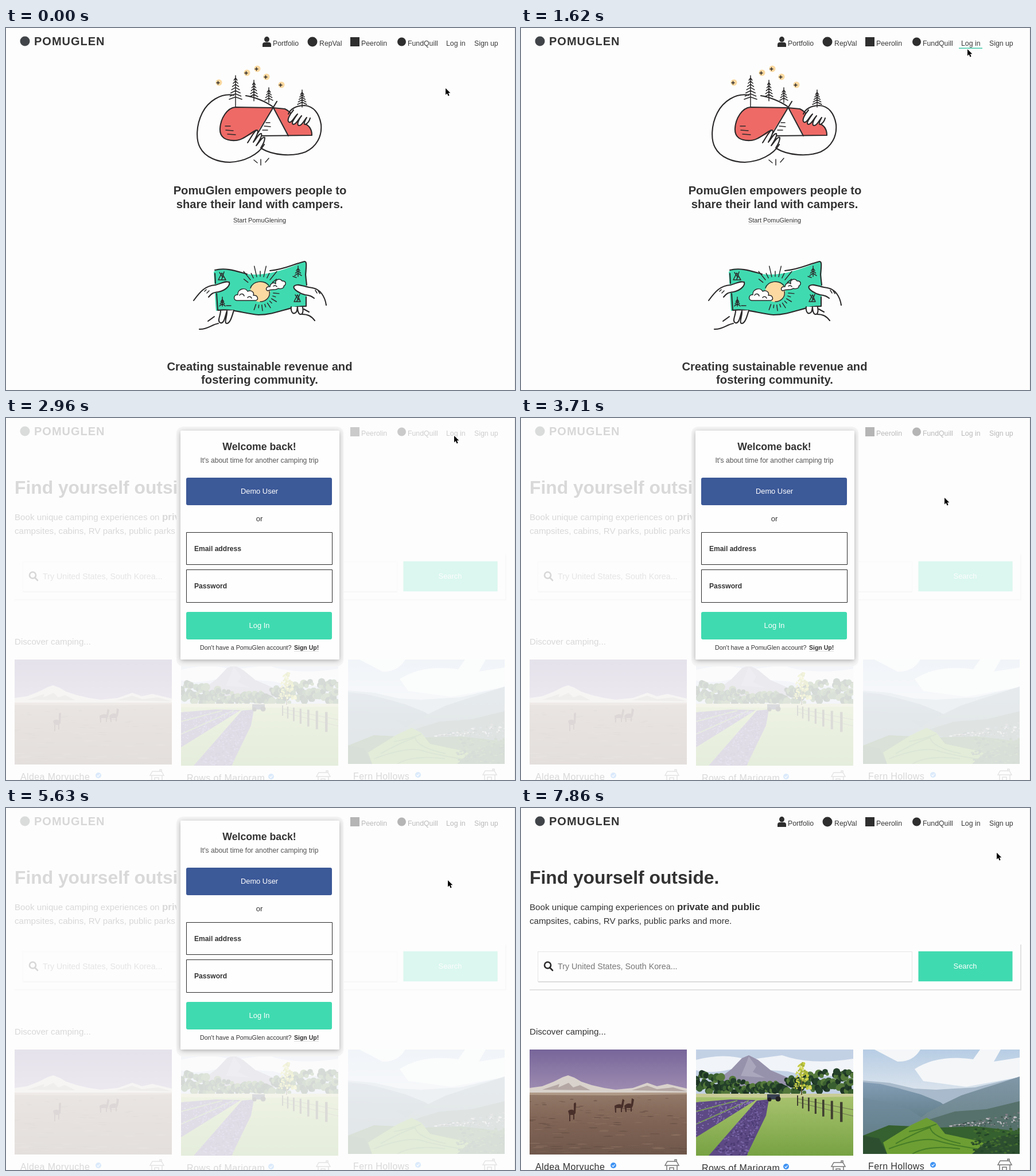
Recreate the animation shown at these times as an HTML page. Size 887 by 631 pixels, loop 8000 ms.

```html
<!DOCTYPE html>
<html lang="en">
<head>
<meta charset="utf-8">
<title>Camping</title>
<style>
  html, body { margin: 0; width: 100%; height: 100%; overflow: hidden; background: #fdfdfd; }
  svg { display: block; }
  text { font-family: "Liberation Sans", Arial, sans-serif; fill: #333; white-space: pre; }
  .b { font-weight: 700; }
  .mid { text-anchor: middle; }
  .light { fill: #fff; }
  .ink { fill: none; stroke: #2c2a2b; stroke-width: 2.1; stroke-linecap: round; stroke-linejoin: round; }
  .thin { stroke-width: 1.5; }
  .white { fill: #fdfdfd; }
  #nav text { font-size: 12.3px; fill: #3a3a3a; }
  #nav .icon { fill: #2e2e2e; }
  .head { font-size: 20.2px; }
  .card { font-size: 16px; letter-spacing: .4px; }
</style>
</head>
<body>
<svg width="100%" height="100%" viewBox="0 0 887 631">
  <defs>
    <linearGradient id="dusk" x2="0" y2="1"><stop stop-color="#77659a"/><stop offset="1" stop-color="#a391b4"/></linearGradient>
    <linearGradient id="soil" x2="0" y2="1"><stop stop-color="#937a69"/><stop offset=".4" stop-color="#826657"/><stop offset="1" stop-color="#6f574b"/></linearGradient>
    <linearGradient id="haze" x2="0" y2="1"><stop stop-color="#b7cde4"/><stop offset=".5" stop-color="#e3e9ef"/></linearGradient>
    <linearGradient id="ridge" x2="0" y2="1"><stop stop-color="#839db5"/><stop offset=".5" stop-color="#637f8b"/><stop offset="1" stop-color="#48655a"/></linearGradient>
    <linearGradient id="slope" x2="0" y2="1"><stop stop-color="#8097a8"/><stop offset="1" stop-color="#667f80"/></linearGradient>
    <linearGradient id="lawn" x2="0" y2="1"><stop stop-color="#a9c36f"/><stop offset="1" stop-color="#77a243"/></linearGradient>
    <filter id="shadow" x="-10%" y="-10%" width="120%" height="120%"><feDropShadow dx="0" dy="2" stdDeviation="4" flood-opacity=".3"/></filter>
    <path id="hut" class="thin" fill="none" stroke="#777" d="M-8-8H8L12-1H-12ZM-9-1V10M9-1V10M-4 10V3H3V10M5-8V-11H8V-7"/>
    <g id="badge"><circle r="5" fill="#3f93f3"/><path d="M-2.3 0L-.5 2 2.5-1.8" fill="none" stroke="#fff" stroke-width="1.2"/></g>
  </defs>
  <rect width="887" height="631" fill="#fdfdfd"/>
  <path d="M886.5 0V631" stroke="#ececec"/>

  <g id="home">
    <g id="stars"></g>
    <path fill="#ee6a66" d="M466 138H398C385 139 374 158 372 175C372 190 382 197 400 197C412 195 424 186 439 180ZM467 139L486 141C500 150 512 165 525 170C532 174 534 180 533 187L493 188Z"/>
    <path class="ink" d="M436 178C424 184 412 196 400 196C382 197 372 190 373 175C374 158 385 139 400 138L465 139L486 141C493 144 497 149 501 154M521 167C530 171 533 178 533 187L443 188M472 128L439 183M466 139L492 188"/>
    <path class="ink" d="M397 117C374 113 352 128 342 148C331 170 331 195 338 208C347 226 370 234 390 234C415 233 440 221 450 203M418 118C432 120 453 128 466 138M445 210C465 222 499 225 522 216C541 207 551 189 549 168C546 149 536 136 520 135C505 135 495 142 492 150"/>
    <path class="ink white" d="M421 200C426 193 432 180 437 178C442 178 436 190 431 199C437 192 441 183 445 184C447 187 441 198 436 205C442 198 448 188 451 191C451 196 448 203 444 209"/>
    <path class="ink white" d="M501 143C494 151 489 161 493 164C497 167 503 154 508 150C501 160 496 167 501 168C506 168 511 157 515 153C509 161 506 170 511 170C516 170 520 160 524 156C520 163 518 169 522 168C526 166 529 161 530 157"/>
    <path class="ink thin" d="M382 171H391M383 178L396 179M386 185L400 186M453 165H460M450 171L461 172M447 178H456M432 230L438 235M444 229V239M452 234L458 227"/>
    <g id="trees"></g>

    <g class="b mid">
      <text class="head" x="442.5" y="290">PomuGlen empowers people to</text>
      <text class="head" x="442" y="314">share their land with campers.</text>
      <text class="head" x="442" y="597">Creating sustainable revenue and</text>
      <text class="head" x="442" y="620">fostering community.</text>
    </g>
    <text class="mid" x="442" y="339" font-size="10.9">Start PomuGlening</text>
    <path d="M396 341.5H488" stroke="#ddd"/>

    <path fill="#40dab0" d="M362 425L368 420C385 418 402 425 420 429C455 433 490 420 519 407Q524 406 524 412C522 440 526 465 522 486C494 485 472 500 440 500C415 498 390 489 366 493C364 470 364 450 362 425Z"/>
    <path class="ink" d="M365 445L364 428M364 422C384 417 402 424 420 429M460 423C485 421 500 412 520 407C525 406 523 418 522 430L524 448M523 469V485C495 484 472 500 440 500C415 498 395 489 369 492L367 463"/>
    <circle cx="443" cy="460" r="17.5" fill="#fbd9a0"/>
    <path class="ink thin" d="M426 453C430 441 450 438 458 449M459 459C461 469 453 477 443 477"/>
    <path id="rays" class="ink thin"/>
    <path class="ink thin white" d="M402 475C395 474 397 464 404 465C403 455 417 451 421 459C428 456 433 461 431 466C439 465 441 474 435 475ZM456 458C451 456 454 450 460 451C461 444 467 443 470 446C468 437 479 436 481 441C488 440 489 447 484 450C485 454 478 455 474 454C470 458 464 454 456 458Z"/>
    <path class="ink thin" d="M407 466C409 462 414 463 415 467M421 470C423 467 427 468 428 471M466 450C468 448 471 449 472 451M370 439H383L376 427ZM376 438L380 425M372 426L378 435M502 477H513L508 465ZM507 476L512 464M504 465L510 474M384 484H392M500 433L506 435"/>
    <path class="white" d="M327 474C340 458 349 450 365 447L387 441C394 446 385 456 373 459C362 461 357 464 348 474Z"/>
    <path class="ink" d="M327 475C338 460 347 449 365 448C374 446 382 440 389 443C391 450 381 458 370 460C360 461 357 464 353 469"/>
    <path class="white" d="M558 484C556 469 548 455 534 453C521 452 508 444 502 450C499 455 512 463 521 465C530 466 533 468 537 471Z"/>
    <path class="ink" d="M558 483C556 469 548 455 534 453C521 452 508 444 502 450C499 455 512 463 521 465C530 466 533 468 537 471"/>
    <path class="ink thin" d="M346 459L349 456M350 462L354 458M544 458L547 463M539 457L542 462"/>
    <path class="ink white" d="M374 493C374 501 367 512 374 514C380 516 382 502 385 493C386 501 379 515 385 515C391 514 394 502 397 492M497 486C496 493 499 499 503 497C508 496 507 490 508 486C508 495 511 502 516 498C519 494 517 489 517 486"/>
    <path class="ink" d="M337 525C351 526 358 517 370 515M352 511L363 503M516 499C526 499 532 502 538 510M519 490L528 495"/>
    <g id="noteTrees"></g>
  </g>

  <g id="explore">
    <text class="b" x="15" y="132" font-size="31.8">Find yourself outside.</text>
    <g font-size="15.15">
      <text x="15" y="178">Book unique camping experiences on</text>
      <text class="b" x="272" y="178" font-size="16.9">private and public</text>
      <text x="15" y="202">campsites, cabins, RV parks, public parks and more.</text>
      <text x="15" y="395">Discover camping...</text>
    </g>
    <path d="M15 317H871V238" fill="none" stroke="#e2e2e2" stroke-width="2"/>
    <rect x="29.5" y="250.5" width="652" height="52" fill="#fdfdfd" stroke="#e6e6e6"/>
    <path d="M30 303H682" stroke="#ddd" stroke-width="2"/>
    <path class="ink" style="stroke-width:2.6" d="M50 278L55 283M52 274A5.5 5.5 0 1 1 41 274A5.5 5.5 0 1 1 52 274"/>
    <text x="64" y="281" font-size="14.25" style="fill:#777">Try United States, South Korea...</text>
    <rect x="692.5" y="249.8" width="164" height="52.4" fill="#40dab0"/>
    <text class="light mid" x="774" y="280" font-size="12.9">Search</text>

    <svg x="15" y="421" width="274" height="183">
      <rect width="274" height="80" fill="url(#dusk)"/>
      <path fill="#d9d2cc" d="M0 67L22 64 42 56 58 48 67 45 78 49 90 56 108 62 130 67 150 70 180 67 205 58 222 64 240 60 274 68V80H0Z"/>
      <path fill="#b5a8a4" d="M22 70L52 60 50 66 68 58 76 66 88 62 106 71ZM178 71L205 63 222 69 250 66 274 73Z"/>
      <rect y="75" width="274" height="108" fill="url(#soil)"/>
      <path fill="#b09a88" d="M0 75H274V78L150 80 0 79Z"/>
      <g id="pebbles"></g>
      <g fill="#49302a">
        <path d="M67 107Q72 103 77 106L77 94 80 92 81 95 80 111 78 113V122H76V114H71V125H69V114Z"/>
        <path d="M148 98Q154 94 160 96L162 86 165 88 163 100 161 103V109H159V102H151V110H149Z"/>
        <path d="M165 98Q171 92 177 95L178 85 182 87 180 98 178 102V108H176V102H169V109H167Z"/>
      </g>
    </svg>
    <svg x="305" y="421" width="274" height="185">
      <rect width="274" height="90" fill="#c3d1e5"/>
      <path fill="#f1f4f8" d="M0 18Q50 5 90 18L150 10Q200 28 274 16V42Q210 52 160 38L70 32Q30 44 0 36Z"/>
      <path fill="#9792ac" d="M38 52L62 34 80 15 92 10 108 18 130 36 172 54V66H38Z"/>
      <path fill="#aaa6bc" d="M92 12L105 30 99 39 120 49 78 46 85 30Z"/>
      <g id="hedge"></g>
      <rect y="79" width="274" height="106" fill="url(#lawn)"/>
      <path fill="#c9cc97" d="M0 77H274V82L150 84 0 83Z"/>
      <path fill="#5d4a85" d="M0 92L60 87 104 88 66 112 0 153ZM22 185L106 89 127 87 122 115 88 185Z"/>
      <path fill="none" stroke="#7b9a58" stroke-width="2" d="M0 108L72 89M0 130L92 89"/>
      <g id="lavender"></g>
      <rect x="124" y="78" width="22" height="9" fill="#384052"/><circle cx="128" cy="87" r="3.5" fill="#222"/><circle cx="143" cy="86" r="4.5" fill="#222"/>
      <path fill="none" stroke="#6d7350" d="M178 86L274 105M178 92L274 116"/>
      <path id="fence" fill="#403f31"/>
      <path d="M184 79V42" stroke="#615b30" stroke-width="2"/>
      <g id="sapling"></g>
    </svg>
    <svg x="596" y="421" width="273" height="182">
      <rect width="273" height="182" fill="url(#haze)"/>
      <path fill="#f4f6f8" d="M20 0H100Q87 22 60 21ZM90 34Q130 8 192 17L204 0H240L228 21 273 14V48L180 65 105 55Z"/>
      <path fill="#a8bacb" d="M0 54L46 58 89 68 127 70 195 66 273 48V130H0Z"/>
      <path fill="url(#ridge)" d="M0 57L30 60 60 67 100 78 135 92 160 110 150 150 0 182Z"/>
      <path fill="#708b9b" opacity=".6" d="M0 84L40 92 80 104 110 124 90 140 0 150Z"/>
      <path fill="url(#slope)" d="M80 136L112 110 140 95 171 80 205 69 240 58 273 47V160H80Z"/>
      <path fill="#56716b" d="M70 140L115 122 160 108 215 104 273 90V165H70Z"/>
      <g id="village"></g>
      <path fill="#35602f" d="M0 150L45 132 91 134 110 122 132 136 200 134 273 143V182H0Z"/>
      <path fill="#6d9e33" d="M35 162L85 131 111 119 128 128 143 147 204 160 243 182H42Z"/>
      <path fill="none" stroke="#477d28" stroke-width="2" d="M57 164Q95 143 117 136Q120 153 170 164M45 173Q105 151 130 159T217 176M86 182Q113 166 169 173M80 143Q105 139 128 130"/>
      <path fill="#2d4f30" d="M190 182L210 164 240 151 273 147V182ZM0 182V150L28 155 42 182Z"/>
      <g id="terraces"></g>
    </svg>

    <text class="card" x="25" y="631">Aldea Morvuche</text>
    <text class="card" x="315" y="633">Rows of Marjoram</text>
    <text class="card" x="605" y="630">Fern Hollows</text>
    <use href="#badge" x="161" y="623"/><use href="#badge" x="462" y="625"/><use href="#badge" x="718" y="622"/>
    <use href="#hut" x="263" y="624"/><use href="#hut" x="553" y="626"/><use href="#hut" x="843" y="623"/>
  </g>

  <g id="brand">
    <circle cx="33" cy="23" r="8.5" fill="#414549"/>
    <text class="b" x="49" y="30" font-size="20" letter-spacing="1">POMUGLEN</text>
  </g>
  <g id="nav">
    <path class="icon" d="M454.5 15a4.5 4.8 0 0 1 0 9.6a4.5 4.8 0 0 1 0-9.6M447 33V29Q447 25 451 25H458Q462 25 462 29V33Z"/>
    <circle class="icon" cx="534" cy="24" r="8.5"/>
    <rect class="icon" x="600" y="16" width="16" height="16"/>
    <circle class="icon" cx="689.5" cy="24" r="7.5"/>
    <text x="465" y="31">Portfolio</text>
    <text x="546" y="31">RepVal</text>
    <text x="619" y="31">Peerolin</text>
    <text x="700" y="31">FundQuill</text>
    <text x="767" y="31">Log in</text>
    <text x="816" y="31">Sign up</text>
    <path id="hover" d="M763 35.3H804" stroke="#40c9a8" stroke-width="1.6"/>
  </g>

  <g id="modal">
    <rect x="297" y="15" width="291" height="418" rx="12" fill="#f5f5f5"/>
    <rect x="304" y="22" width="277" height="399" rx="2" fill="#fefefe" filter="url(#shadow)"/>
    <text class="b mid" x="441.5" y="56" font-size="17.7">Welcome back!</text>
    <text class="mid" x="441.5" y="78" font-size="12.1" style="fill:#555">It's about time for another camping trip</text>
    <rect x="314" y="104" width="254" height="48" rx="3" fill="#3c5998"/>
    <text class="light mid" x="441.5" y="132" font-size="12.9">Demo User</text>
    <text class="mid" x="441.5" y="180" font-size="13">or</text>
    <path d="M314.5 199.5H568.5V255.5H314.5ZM314.5 264.5H568.5V321.5H314.5Z" fill="none" stroke="#2a2a2a"/>
    <text class="b" x="328" y="232" font-size="12.1">Email address</text>
    <text class="b" x="328" y="297" font-size="12.1">Password</text>
    <rect x="314" y="338" width="254" height="48" rx="3" fill="#40dab0"/>
    <text class="light mid" x="441.5" y="366" font-size="12.9">Log In</text>
    <text x="338" y="404" font-size="10.7">Don't have a PomuGlen account?</text>
    <text class="b" x="502" y="404" font-size="10.5">Sign Up!</text>
    <path d="M502 406.5H545" stroke="#ddd"/>
  </g>
  <path id="cursor" d="M0 0V11.5L2.7 9 4.6 13.4 6.6 12.5 4.7 8.3H8.3Z" stroke="#fff" stroke-width="1.4" paint-order="stroke"/>
</svg>
<script>
const $ = id => document.getElementById(id);
const noise = n => { const v = Math.sin(n * 12.9898) * 43758.5453; return v - Math.floor(v); };
const repeat = (n, draw) => Array.from({ length: n }, (_, i) => draw(i)).join('');

function tree(x, top, bottom, width, rows) {
  const step = (bottom - top) * .72 / rows;
  const branches = repeat(rows, i => {
    const y = top + 4 + i * step, w = width * (i + 2) / (rows + 1);
    return `M${x - w} ${y + 4}L${x} ${y}L${x + w} ${y + 4}`;
  });
  return `<path class="ink thin" d="M${x} ${top}V${bottom}${branches}"/>`;
}

$('trees').innerHTML = tree(400, 83, 137, 11, 7) + tree(432, 91, 127, 7, 5) +
  tree(458, 104, 130, 7, 4) + tree(516, 108, 138, 8, 5);
$('noteTrees').innerHTML = tree(509, 415, 433, 6, 3) + tree(377, 469, 485, 5, 3);
$('stars').innerHTML = [[371, 95], [420, 78], [438, 71], [454, 85], [480, 99]].map(([x, y]) =>
  `<circle cx="${x}" cy="${y}" r="5.5" fill="#fbd9a0"/>
   <path class="ink thin" d="M${x - 4} ${y + .5}h5M${x - 1.5} ${y - 2}v5"/>`).join('');

const ray = (deg, from, to) => {
  const c = Math.cos(deg * Math.PI / 180), s = Math.sin(deg * Math.PI / 180);
  return `M${443 + c * from} ${460 + s * from}L${443 + c * to} ${460 + s * to}`;
};
$('rays').setAttribute('d',
  repeat(9, i => ray(-142 + i * 13, 27, i % 2 ? 46 : 36)) + repeat(9, i => ray(5 + i * 13, 23, i % 2 ? 28 : 33)));

// Scatter small ellipses; place(u, v, i) returns [x, y, rx, ry].
function scatter(id, count, colors, place) {
  $(id).innerHTML = repeat(count, i => {
    const [x, y, rx, ry = rx] = place(noise(i + 1), noise(i + 500), i);
    return `<ellipse cx="${x}" cy="${y}" rx="${rx}" ry="${ry}" fill="${colors[i % colors.length]}"/>`;
  });
}

scatter('pebbles', 130, ['#7a6052', '#8b705f', '#664f44'], (u, v) => [274 * u, 84 + 96 * v, 3 + 9 * v, .6]);
scatter('hedge', 220, ['#24402a', '#3a5f30', '#1d3424', '#55793b'], (u, v, i) => {
  const x = i * 1.25, rise = 14 + 24 * Math.min(1, Math.abs(x - 110) / 110);
  return [x, 76 - rise * v, 3 + 4 * u];
});
scatter('lavender', 420, ['#8f7cba', '#4b3b73', '#7865a6'], (u, v, i) => {
  if (i % 3 === 0) return [98 * v, 91 + (98 - 98 * v) * .62 * u, 1.3, .8];
  return [106 - 82 * v + (19 + 46 * v) * u, 90 + 94 * v, .8 + 1.2 * v, .8 + .6 * v];
});
scatter('sapling', 80, ['#c6cc3f', '#a5b13a', '#d8d95c'], (u, v) =>
  [184 + (u - .5) * (10 + 22 * v), 24 + 44 * v, 1.2 + 1.5 * u]);
scatter('village', 150, ['#c0bec3', '#807f88', '#3d514c', '#62706c'], (u, v) =>
  [150 + 123 * u, 134 - 26 * v * u, 1 + 1.6 * v, 1.1]);
scatter('terraces', 110, ['#244528', '#456f30', '#365b2d'], (u, v) => [190 + 83 * u, 180 - 42 * v, 2.5, 1.6]);
$('fence').setAttribute('d', repeat(7, i =>
  `M${176 + i * 8 + i * i * .75} ${80 + i * 1.9}h${2 + i * .4}v${18 + i * 2.8}h${-2 - i * .4}Z`));

const LOOP = 8000, OPEN = 2950, CLOSE = 7850, STEP = 148;
const cursorPath = [
  [0, 766, 105], [444, 760, 75], [740, 769, 36], [1036, 771, 39], [1184, 771, 39],
  [1628, 778, 37], [1924, 781, 31], [2960, 781, 31], [3848, 729, 161], [4588, 721, 167],
  [4884, 701, 185], [5328, 701, 185], [5920, 838, 67], [6364, 829, 78], [LOOP, 829, 78]
];

function cursorAt(time) {
  const i = cursorPath.findIndex(key => key[0] > time);
  const [t0, x0, y0] = cursorPath[i - 1], [t1, x1, y1] = cursorPath[i];
  const k = (time - t0) / (t1 - t0);
  return [x0 + (x1 - x0) * k, y0 + (y1 - y0) * k].map(Math.round);
}

const show = (id, on) => $(id).style.display = on ? '' : 'none';

function frame(now) {
  const raw = now % LOOP;
  const time = Math.min(Math.floor((raw + 10) / STEP) * STEP, LOOP - 1);
  const modal = raw >= OPEN && raw < CLOSE;
  show('home', raw < OPEN);
  show('explore', raw >= OPEN);
  show('modal', modal);
  show('hover', time >= 1480 && raw < OPEN);
  $('explore').style.opacity = $('brand').style.opacity = modal ? .18 : 1;
  $('nav').style.opacity = modal ? Math.min(.34, .24 + (time - 2960) / 3000) : 1;
  $('cursor').setAttribute('transform', `translate(${cursorAt(time)})`);
  requestAnimationFrame(frame);
}
requestAnimationFrame(frame);
</script>
</body>
</html>
```
